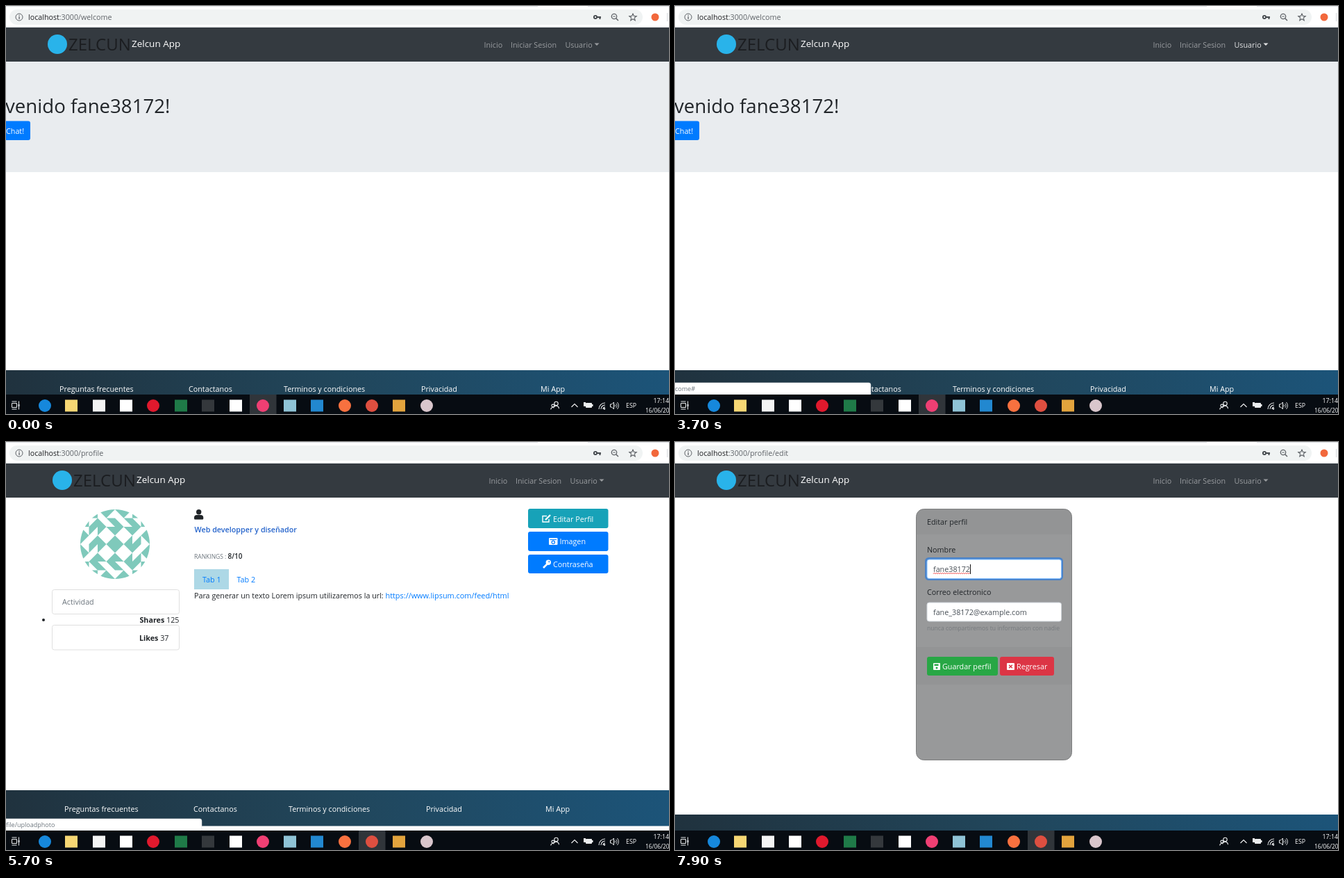
Write an HTML page with a canvas that moves like this. It is 955 px wide and 587 px high and loops after 8000 ms.

```html
<!DOCTYPE html>
<html lang="es">
<head>
<meta charset="utf-8">
<title>Zelcun App</title>
<style>
html, body { margin: 0; width: 100%; height: 100%; overflow: hidden; background: #fff; }
canvas { display: block; }
</style>
</head>
<body>
<canvas id="stage" width="955" height="587"></canvas>
<script>
const ctx = document.getElementById('stage').getContext('2d');
const LOOP = 8000, STEP = 100, W = 955, H = 587;
const FONT = '"Open Sans", "Noto Sans", sans-serif';
const BASE = 10.75;
const BLUE = '#007bff', INK = '#212529', MUTED = '#6c757d', TEAL = '#7fc9bb';
const USER = 'fane38172', EMAIL = 'fane_38172@example.com';

function text(s, x, y, color = INK, size = BASE, weight = 400, align = 'left') {
  ctx.font = `${weight} ${size}px ${FONT}`;
  ctx.textAlign = align;
  ctx.fillStyle = color;
  ctx.fillText(s, x, y);
}

function rect(x, y, w, h, color) {
  ctx.fillStyle = color;
  ctx.fillRect(x, y, w, h);
}

function box(x, y, w, h, r, fill, stroke, line = 1) {
  ctx.beginPath();
  ctx.roundRect(x, y, w, h, r);
  if (fill) { ctx.fillStyle = fill; ctx.fill(); }
  if (stroke) { ctx.strokeStyle = stroke; ctx.lineWidth = line; ctx.stroke(); }
}

function dot(x, y, r, color) {
  ctx.beginPath();
  ctx.arc(x, y, r, 0, 7);
  ctx.fillStyle = color;
  ctx.fill();
}

function ring(x, y, r, color, line = 1, from = 0, to = Math.PI * 2) {
  ctx.beginPath();
  ctx.arc(x, y, r, from, to);
  ctx.strokeStyle = color;
  ctx.lineWidth = line;
  ctx.stroke();
}

function trace(points) {
  ctx.beginPath();
  points.forEach(([x, y], i) => i ? ctx.lineTo(x, y) : ctx.moveTo(x, y));
}

function lines(points, color, width = 1) {
  trace(points);
  ctx.strokeStyle = color;
  ctx.lineWidth = width;
  ctx.stroke();
}

function poly(points, color) {
  trace(points);
  ctx.fillStyle = color;
  ctx.fill();
}

// Blend two [r, g, b] colours
const mix = (a, b, k) => `rgb(${a.map((v, i) => Math.round(v + (b[i] - v) * k))})`;

// Value of the last [time, value] pair that has started
const at = (t, keys) => keys.reduce((v, [start, next]) => t >= start ? next : v, null);

const statusText = [[1300, ''], [3400, 'come#'], [4100, 'file'], [5200, 'file/uploadphoto'],
  [5800, 'file/edit'], [6500, null]];
const pathText = [[0, 'welcome'], [4600, 'profile'], [6500, 'profile/edit']];
const pageName = [[0, 'welcome'], [4600, 'profile'], [6600, 'form']];
const inicioLit = [[900, true], [2900, false], [3100, true], [3400, false]];
const usuarioLit = [[3600, true], [5700, false]];
const menuOpen = [[3800, true], [5700, false]];
const browserFocus = [[2600, true], [2900, false], [3800, true]];

function addressBar(path) {
  const gray = '#5f6368';
  rect(0, 0, W, 31, '#fff');
  rect(0, 0, 766, 1, '#dfe2e6');
  rect(838, 0, 117, 1, '#dfe2e6');
  box(5, 5, 912, 22, 11, '#f0f3f3');
  ring(19, 16, 5, gray);
  rect(18.4, 15, 1.3, 4, gray);
  rect(18.4, 12.8, 1.3, 1.3, gray);
  text('localhost', 32, 20, '#202124', 10.7);
  text(':3000/' + path, 32 + ctx.measureText('localhost').width, 20, gray, 10.7);
  ring(849, 16, 2.1, '#454a4e', 1.9);
  rect(851, 15, 6, 2, '#454a4e');
  rect(854.5, 16, 2, 3, '#454a4e');
  ring(876, 15, 3.7, gray, 1.3);
  lines([[878.7, 17.7], [882, 21]], gray, 1.5);
  lines([[874.2, 15], [877.8, 15]], gray);
  const star = [];
  for (let i = 0; i <= 10; i++) {
    const a = i * Math.PI / 5 - Math.PI / 2, r = i % 2 ? 2.4 : 5.5;
    star.push([903 + r * Math.cos(a), 16.3 + r * Math.sin(a)]);
  }
  lines(star, gray, 1.1);
  dot(935, 16, 5.5, '#f2683c');
  rect(952, 10, 1, 12, '#d5d8dc');
  rect(0, 30, W, 1, '#d9dcde');
}

function navbar(dx, inicio, usuario) {
  const link = lit => lit ? '#e3e4e5' : '#999c9f';
  rect(0, 31, W, 49, '#343a40');
  dot(74 + dx, 55, 14, '#29b3ea');
  text('ZELCUN', 90 + dx, 64, '#1b1d20', 24);
  text('Zelcun App', 181 + dx, 59, '#fff', 13.5);
  text('Inicio', 688.5 + dx, 59.5, link(inicio));
  text('Iniciar Sesion', 727 + dx, 59.5, link(false));
  text('Usuario', 805.5 + dx, 59.5, link(usuario));
  poly([[847.5 + dx, 53.5], [854.5 + dx, 53.5], [851 + dx, 57]], link(usuario));
}

function menu(dx, pressed) {
  box(800.5 + dx, 71.5, 114, 97, 3, '#fff', '#c9cbcd');
  if (pressed) rect(801 + dx, 77, 114, 23.5, BLUE);
  text('Mi perfil', 818 + dx, 93.5, pressed ? '#fff' : INK);
  text('Chat', 818 + dx, 116);
  rect(801 + dx, 128, 113, 1, '#e9ecef');
}

function footer(y, h, dx) {
  const g = ctx.createLinearGradient(0, y + h, W, y);
  g.addColorStop(0, '#20323e');
  g.addColorStop(0.5, '#21465b');
  g.addColorStop(1, '#1c5479');
  rect(0, y, W, h, g);
  [['Preguntas frecuentes', 77], ['Contactanos', 263], ['Terminos y condiciones', 400],
   ['Privacidad', 598], ['Mi App', 770]].forEach(([s, x]) => text(s, x + dx, y + 31, '#fff'));
}

function statusBar(s) {
  box(-4, 542, 286, 20, 3, '#fff', '#d4d7da', 0.5);
  text(s, 0, 554, MUTED, 9);
}

function welcomePage() {
  rect(0, 80, W, 159, '#e9ecef');
  text('venido ' + USER + '!', -1, 154, INK, 27.6, 500);
  box(-20, 165.5, 55, 27.5, 3, BLUE);
  text('Chat!', 0, 184, '#fff');
  footer(524, 52, 0);
}

function avatar(cx, cy) {
  const c = 25;
  ctx.save();
  ctx.beginPath();
  ctx.arc(cx, cy, 50, 0, 7);
  ctx.clip();
  rect(cx - c, cy - c, 2 * c, 2 * c, TEAL);
  ctx.translate(cx, cy);
  for (let i = 0; i < 4; i++) {
    poly([[-c, -c / 2], [-c / 2, -c], [0, -c / 2], [-c / 2, 0]], '#fff');
    for (const x of [-c, 0]) {
      poly([[x, -2 * c], [x + c, -2 * c], [x + c / 2, -1.5 * c]], TEAL);
      poly([[x, -1.5 * c], [x + c / 2, -c], [x, -c]], TEAL);
      poly([[x + c / 2, -1.5 * c], [x + c, -1.5 * c], [x + c, -c]], TEAL);
    }
    poly([[-2 * c, -c], [-1.5 * c, -1.5 * c], [-1.5 * c, -c]], TEAL);
    poly([[-1.5 * c, -c], [-c, -1.5 * c], [-c, -c]], TEAL);
    poly([[-1.5 * c, -1.5 * c], [-c, -2 * c], [-c, -1.5 * c]], TEAL);
    ctx.rotate(Math.PI / 2);
  }
  ctx.restore();
}

function profilePage(hover) {
  avatar(157, 147);
  box(66.5, 212.5, 183, 35, 3, '#fff', '#dfdfdf');
  text('Actividad', 81, 234, MUTED);
  dot(54, 256, 2, INK);
  box(66.5, 263.5, 183, 35.5, 3, '#fff', '#dfdfdf');
  [['Shares', '125', 249.5, 259.5], ['Likes', '37', 234.5, 286]].forEach(([name, n, x, y]) => {
    text(n, x, y, INK, BASE, 400, 'right');
    text(name, x - ctx.measureText(' ' + n).width, y, INK, BASE, 700, 'right');
  });

  dot(277.7, 100.7, 3.7, INK);
  box(271, 105, 13.3, 6.5, [4, 4, 1.5, 1.5], INK);
  text('Web developper y diseñador', 271.5, 130, '#2463cb', BASE, 600);
  text('RANKINGS :', 271, 168, MUTED, 8.5);
  text('8/10', 319.5, 168, INK, 10, 600);
  rect(271, 183, 50, 29, '#add8e6');
  text('Tab 1', 283, 202, BLUE);
  text('Tab 2', 332.5, 202, BLUE);
  text('Para generar un texto Lorem ipsum utilizaremos la url:', 271, 225);
  text('https://www.lipsum.com/feed/html', 546.5, 225, BLUE, 10.9);

  box(752, 96, 115.5, 28, 3, mix([23, 162, 184], [19, 132, 150], hover));
  box(752, 129, 115.5, 28, 3, BLUE);
  box(752, 162, 115.5, 27, 3, BLUE);
  text('Editar Perfil', 788, 114.5, '#fff');
  text('Imagen', 797.5, 147, '#fff');
  text('Contraseña', 788, 180, '#fff');
  lines([[779, 106.5], [773, 106.5], [773, 115], [782, 115], [782, 111]], '#fff', 1.4);
  lines([[777, 112], [784, 105]], '#fff', 2.4);
  box(782, 138, 12.5, 10, 1, '#fff');
  rect(783.5, 140, 9.5, 1, BLUE);
  ring(788.3, 144.3, 2.2, BLUE, 1.2);
  dot(781.3, 173.3, 3.7, '#fff');
  lines([[780, 175], [774, 181]], '#fff', 2.6);
  dot(782.3, 172.3, 1, BLUE);
  footer(501, 51.5, 7);
}

function formPage(focus) {
  box(347.5, 96.5, 224, 361, 11, '#98999a', '#7c7d7e');
  box(348, 97, 223, 36, [11, 11, 0, 0], 'rgba(0,0,0,.03)');
  rect(348, 295, 223, 54, 'rgba(0,0,0,.03)');
  text('Editar perfil', 363, 119);
  text('Nombre', 363, 159);
  if (focus) box(361.5, 167.5, 196, 30, 4, null, `rgba(50,125,215,${0.75 * focus})`, 3);
  box(363, 169, 193.5, 27.5, 3, '#fff', mix([206, 212, 218], [128, 189, 255], focus));
  text(USER, 372, 187, '#495057');
  if (focus) {
    const end = 372 + ctx.measureText(USER).width, wave = [];
    for (let x = 372, i = 0; x <= end; x += 1.5, i++) wave.push([x, i % 2 ? 188.2 : 189.8]);
    lines(wave, '#e33', 0.9);
    rect(Math.round(end), 176, 1, 14, '#111');
  }
  text('Correo electronico', 363, 220);
  box(363, 231, 193.5, 27, 3, '#fff', '#ced4da');
  text(EMAIL, 372, 249, '#495057');
  text('nunca compartiremos tu informacion con nadie', 363, 270.5, '#777b7f', 8.6);

  box(363, 309, 102, 27, 3, '#28a745');
  text('Guardar perfil', 385, 327, '#fff');
  box(372, 318, 10, 10, 1, '#fff');
  rect(373.5, 319.5, 6, 2.5, '#28a745');
  dot(377, 325, 1.5, '#28a745');
  box(468, 309, 78, 27, 3, '#dc3545');
  text('Regresar', 492, 327, '#fff');
  box(478, 318, 11, 10, 1, '#fff');
  lines([[481.2, 320.7], [485.8, 325.3]], '#dc3545', 1.6);
  lines([[485.8, 320.7], [481.2, 325.3]], '#dc3545', 1.6);
  footer(536, 52, 0);
}

// Plain marker per taskbar app: [centre x, colour, round]
const apps = [[56, '#1688dc', 1], [94, '#f7d774', 0], [134, '#f4f4f4', 0], [173, '#fff', 0],
  [212, '#e0192d', 1], [252, '#1f7a48', 0], [291, '#34383c', 0], [331, '#fff', 0],
  [370, '#ef3f73', 1], [409, '#8fc3d6', 0], [448, '#2288d0', 0], [488, '#f8713f', 1],
  [527, '#de4f40', 1], [566, '#e2a33d', 0], [606, '#d9c6cc', 1]];

function taskbar(browserActive) {
  const c = '#eceeef';
  rect(0, 559, W, 28, '#070c12');
  rect(browserActive ? 508 : 351, 559, 38.5, 28, '#30353a');
  box(8.5, 571.5, 7, 6, 0, null, c);
  lines([[8.5, 569], [15.5, 569]], c);
  lines([[8.5, 580], [15.5, 580]], c);
  lines([[18.5, 568.5], [18.5, 580.5]], c);
  rect(17.5, 573, 2, 3, c);
  for (const [x, color, round] of apps) {
    if (round) dot(x, 575, 9, color);
    else rect(x - 9, 566.5, 18, 17, color);
  }

  ring(792.5, 572, 2.7, c, 1.1);
  ring(787.8, 575, 1.9, c, 1.1);
  ring(792.5, 579.3, 4, c, 1.1, Math.PI * 1.2, Math.PI * 2);
  ring(787.8, 580.5, 3, c, 1.1, Math.PI, Math.PI * 1.7);
  lines([[814.5, 577], [819, 572.5], [823.5, 577]], c, 1.2);
  box(835.5, 571.5, 8, 6, 0, c, c);
  rect(844, 573, 1.5, 3, c);
  rect(832, 570, 3, 6, c);
  for (const r of [3, 6, 9]) ring(863, 580, r, c, 1.1, Math.PI, Math.PI * 1.5);
  dot(862, 579.5, 1.2, c);
  lines([[870.5, 573], [872.5, 573], [875.5, 570], [875.5, 580], [872.5, 577], [870.5, 577], [870.5, 573]], c);
  for (const r of [2, 4.5, 7]) ring(875.5, 575, r, c, 0.9, -0.8, 0.8);
  text('ESP', 893, 578, '#fff', 8.8);
  text('17:14', 955, 570.5, '#fff', 8.8, 400, 'right');
  text('16/06/2019', 921, 585, '#fff', 8.3);
}

function draw(t) {
  const page = at(t, pageName), dx = page === 'profile' ? 7 : 0;
  rect(0, 0, W, H, '#fff');
  if (page === 'welcome') welcomePage();
  else if (page === 'profile') profilePage(at(t, [[0, 0], [6100, 0.5], [6200, 1]]));
  else formPage(at(t, [[0, 0], [7800, 0.5], [7900, 1]]));
  navbar(dx, at(t, inicioLit), at(t, usuarioLit));
  if (at(t, menuOpen)) menu(dx, t >= 4500);
  const status = at(t, statusText);
  if (status !== null) {
    ctx.globalAlpha = t < 1400 ? 0.5 : 1;
    statusBar(status);
    ctx.globalAlpha = 1;
  }
  addressBar(at(t, pathText));
  taskbar(at(t, browserFocus));
}

const start = performance.now();
function tick() {
  const t = (performance.now() - start) % LOOP;
  draw(Math.floor(t / STEP) * STEP);
  requestAnimationFrame(tick);
}
tick();
</script>
</body>
</html>
```
